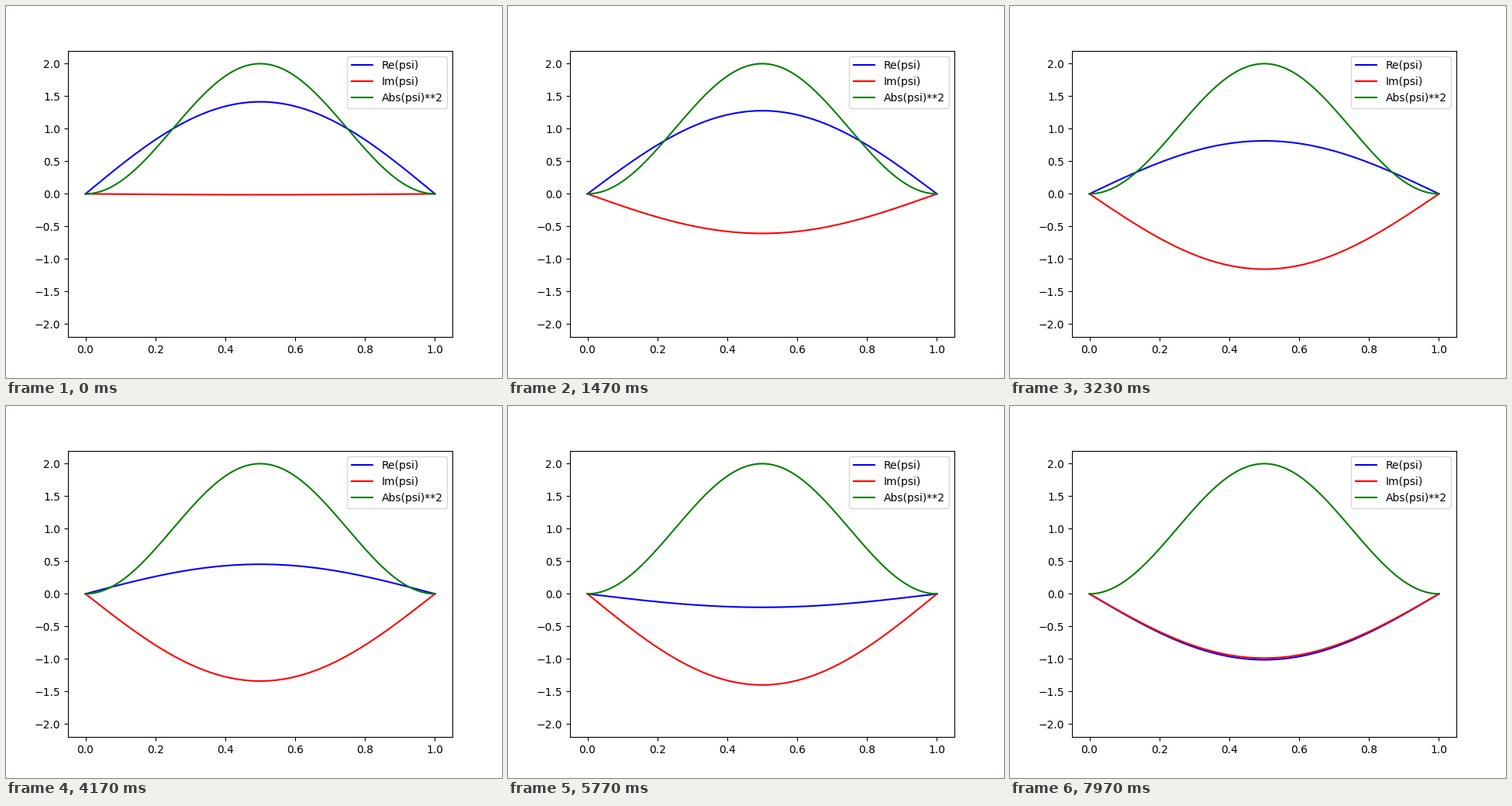
These frames come from a looping animation (640 px wide and 480 px high, 8000 ms). A matplotlib script:

```python
import numpy as np
import matplotlib.pyplot as plt
from matplotlib.animation import FuncAnimation

FRAMES = 240
LOOP_MS = 8000
DT = 0.002
ENERGY = np.pi ** 2 / 2  # ground state of a unit-width box

x = np.linspace(0, 1, 201)
ground = np.sqrt(2) * np.sin(np.pi * x)

fig, ax = plt.subplots(figsize=(6.4, 4.8), dpi=100)
ax.set_xlim(-0.05, 1.05)
ax.set_ylim(-2.2, 2.2)

re_line, = ax.plot([], [], color="blue", label="Re(psi)")
im_line, = ax.plot([], [], color="red", label="Im(psi)")
abs_line, = ax.plot([], [], color="green", label="Abs(psi)**2")
ax.legend(loc="upper right")


def update(frame):
    psi = ground * np.exp(-1j * ENERGY * DT * (frame + 1))
    re_line.set_data(x, psi.real)
    im_line.set_data(x, psi.imag)
    abs_line.set_data(x, np.abs(psi) ** 2)
    return re_line, im_line, abs_line


def init():
    return update(0)


anim = FuncAnimation(fig, update, frames=FRAMES, init_func=init,
                     interval=LOOP_MS / FRAMES, repeat=True, repeat_delay=0)

plt.show()
```
